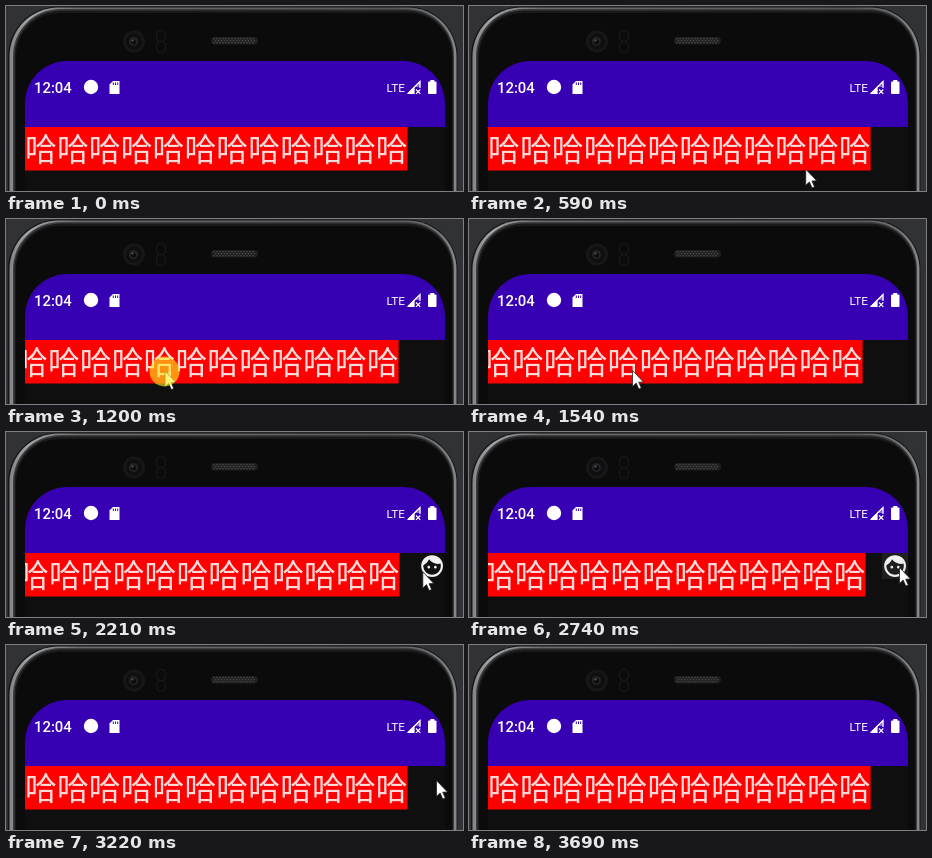
Recreate the animation shown at these times as an HTML page with a canvas. Size 457 by 185 pixels, loop 4.42 s.

```html
<!DOCTYPE html>
<html lang="zh-CN">
<head>
<meta charset="utf-8">
<style>
html, body { margin: 0; width: 100%; height: 100%; overflow: hidden; background: #313235; }
canvas { display: block; width: 457px; height: 185px; }
</style>
</head>
<body>
<canvas id="stage" width="457" height="185"></canvas>
<script>
const W = 457, H = 185, LOOP = 4420, TICK = 67;
const ctx = document.getElementById('stage').getContext('2d');
const LINE = '哈'.repeat(12);
const PURPLE = '#3700b3', WHITE = '#fff';

const ramp = (k, a, b) => Math.min(1, Math.max(0, (k - a) / (b - a)));
const easeIn = u => u ** 2.4;
const easeOut = u => 1 - (1 - u) ** 1.75;
const easeBoth = u => u * u * (3 - 2 * u);
const linear = u => u;

// each leg starts where the one before it ended
const HOME = { x: 352, y: 176 };
const LEGS = [
  { from: 8, to: 11, x: 321, y: 152, ease: easeOut },
  { from: 13, to: 18, x: 158.5, y: 152.5, ease: easeIn },
  { from: 18, to: 20, x: 163, y: 152, ease: linear },
  { from: 23, to: 29, x: 384, y: 151, ease: easeBoth },
  { from: 29, to: 37, x: 430, y: 136, ease: easeOut },
  { from: 50, to: 54, x: 422, y: 177, ease: linear }
];

function pointerAt(k) {
  let { x, y } = HOME;
  for (const leg of LEGS) {
    const u = leg.ease(ramp(k, leg.from, leg.to));
    x += (leg.x - x) * u;
    y += (leg.y - y) * u;
  }
  return [x, y];
}

function scrollAt(k) {
  const pulled = k < 22 ? 9 * ramp(k, 15, 17) : 8;
  return -pulled * (1 - ramp(k, 40, 45)) ** 2;
}

function box(x, y, w, h, r, color) {
  ctx.beginPath();
  ctx.roundRect(x, y, w, h, r);
  ctx.fillStyle = color;
  ctx.fill();
}

function disc(x, y, r, color) {
  ctx.beginPath();
  ctx.arc(x, y, r, 0, Math.PI * 2);
  ctx.fillStyle = color;
  ctx.fill();
}

function poly(points, color) {
  ctx.beginPath();
  points.forEach(([x, y]) => ctx.lineTo(x, y));
  ctx.closePath();
  ctx.fillStyle = color;
  ctx.fill();
}

function label(text, x, y, font, color) {
  ctx.font = font;
  ctx.fillStyle = color;
  ctx.fillText(text, x, y);
}

// body outline running off the bottom edge
const shell = (left, top, right, r, color) => box(left, top, right - left, 300, r, color);

const metal = ctx.createLinearGradient(0, 0, W, 0);
metal.addColorStop(0, '#7c7e80');
metal.addColorStop(0.05, '#a4a6a8');
metal.addColorStop(0.16, '#6a6b6d');
metal.addColorStop(0.85, '#58595b');
metal.addColorStop(1, '#8a8c8e');

function phone() {
  ctx.fillStyle = '#313235';
  ctx.fillRect(0, 0, W, H);
  shell(2, 0.5, 451.5, 50, '#151617');
  shell(3.5, 1.5, 450.5, 49, metal);
  shell(7, 3, 448, 47, '#3c3d3f');
  shell(8.5, 4.5, 447, 46, '#1a1a1b');
  shell(10, 7, 446, 44, '#0b0b0c');

  disc(128, 35.5, 11, '#171718');
  disc(128, 35.5, 8, '#0f0f10');
  disc(127.5, 35.5, 4.5, '#222426');
  disc(127.5, 36, 2.5, '#0b0c0e');
  disc(126.5, 34.5, 1.1, '#565a5e');

  ctx.strokeStyle = '#1b1b1c';
  ctx.lineWidth = 1;
  ctx.beginPath();
  ctx.roundRect(150.5, 24.5, 9, 11, 4);
  ctx.roundRect(150.5, 35.5, 9, 11, 4);
  ctx.stroke();

  box(205, 31, 47, 7.5, 3.7, '#1f1f20');
  for (let row = 0; row < 3; row++)
    for (let i = 0; i < 14; i++)
      disc(208 + i * 3 + (row % 2) * 1.5, 32.7 + row * 2, 0.8, '#4c4d4e');
}

function statusBar() {
  box(19, 55, 420, 130, [42, 42, 0, 0], '#100f10');
  box(19, 55, 420, 66, [42, 42, 0, 0], PURPLE);
  label('12:04', 28, 87, '500 14.9px Roboto, sans-serif', WHITE);
  disc(85, 81, 7.2, WHITE);

  poly([[107, 75], [113.5, 75], [113.5, 88], [103.5, 88], [103.5, 78.5]], WHITE);
  for (let i = 0; i < 3; i++) box(106.8 + i * 2.2, 76.5, 1, 2.5, 0, PURPLE);

  label('LTE', 380.5, 86, '11.7px Roboto, sans-serif', WHITE);

  poly([[414.5, 74.5], [414.5, 81], [408.5, 81], [408.5, 88], [401, 88]], 'rgba(255,255,255,.4)');
  poly([[408.5, 80.5], [408.5, 88], [401, 88]], WHITE);
  ctx.strokeStyle = WHITE;
  ctx.lineWidth = 1.2;
  ctx.beginPath();
  ctx.moveTo(402, 87.5); ctx.lineTo(414, 75.5); ctx.lineTo(414, 82);
  ctx.moveTo(410, 83.5); ctx.lineTo(414.3, 87.8);
  ctx.moveTo(414.3, 83.5); ctx.lineTo(410, 87.8);
  ctx.stroke();

  box(422, 75.5, 8.5, 12.5, 1, WHITE);
  box(424.3, 74, 4, 2, 0, WHITE);
}

const eye = x => `M${x} 11.75a1.25 1.25 0 1 0 0 2.5a1.25 1.25 0 1 0 0-2.5z`;
const facePath = new Path2D(eye(9) + eye(15) +
  'M12 2a10 10 0 1 0 0 20a10 10 0 1 0 0-20z' +
  'M12 20c-4.41 0-8-3.59-8-8 0-.29.02-.58.05-.86 2.36-1.05 4.23-2.98 5.21-5.37' +
  'C11.07 8.33 14.05 10 17.42 10c.78 0 1.53-.09 2.25-.26.21.71.33 1.47.33 2.26 0 4.41-3.59 8-8 8z');

function face(k) {
  const ripple = ramp(k, 40, 42) * (1 - ramp(k, 44, 48));
  box(413, 121, 26, 26, 0, `rgba(255,255,255,${0.13 * ripple})`);
  ctx.save();
  ctx.globalAlpha = 1 - ramp(k, 45, 48);
  ctx.translate(413, 121);
  ctx.scale(1.09, 1.09);
  ctx.fillStyle = '#f0f0f0';
  ctx.fill(facePath, 'evenodd');
  ctx.restore();
}

function banner(dx) {
  ctx.save();
  ctx.beginPath();
  ctx.rect(19, 121, 420, 64);
  ctx.clip();
  box(19 + dx, 121, 382.6, 43.6, 0, '#f00');
  label(LINE, 19 + dx, 155.2, '31.9px "Noto Sans CJK SC", "Noto Sans CJK", sans-serif', '#fddada');
  ctx.restore();
}

const ARROW = [[0, 0], [0, 16], [3.7, 12.6], [6.3, 18.6], [8.8, 17.5], [6.2, 11.7], [11, 11.5]];

function pointer(x, y, pressed) {
  ctx.save();
  ctx.translate(x + 0.5, y - 0.5);
  poly(ARROW, WHITE);
  ctx.strokeStyle = '#222';
  ctx.lineWidth = 0.8;
  ctx.stroke();
  ctx.restore();
  if (pressed) disc(x, y, 15, 'rgba(255,235,30,.62)');
}

function draw(t) {
  const k = Math.floor((t + 16) / TICK);
  const within = (a, b) => k >= a && k < b;
  phone();
  statusBar();
  banner(scrollAt(k));
  if (within(24, 48)) face(k);
  if (within(8, 55)) pointer(...pointerAt(k), within(14, 22) || within(39, 41));
}

const start = performance.now();
function frame() {
  draw((performance.now() - start) % LOOP);
  requestAnimationFrame(frame);
}
frame();
</script>
</body>
</html>
```
